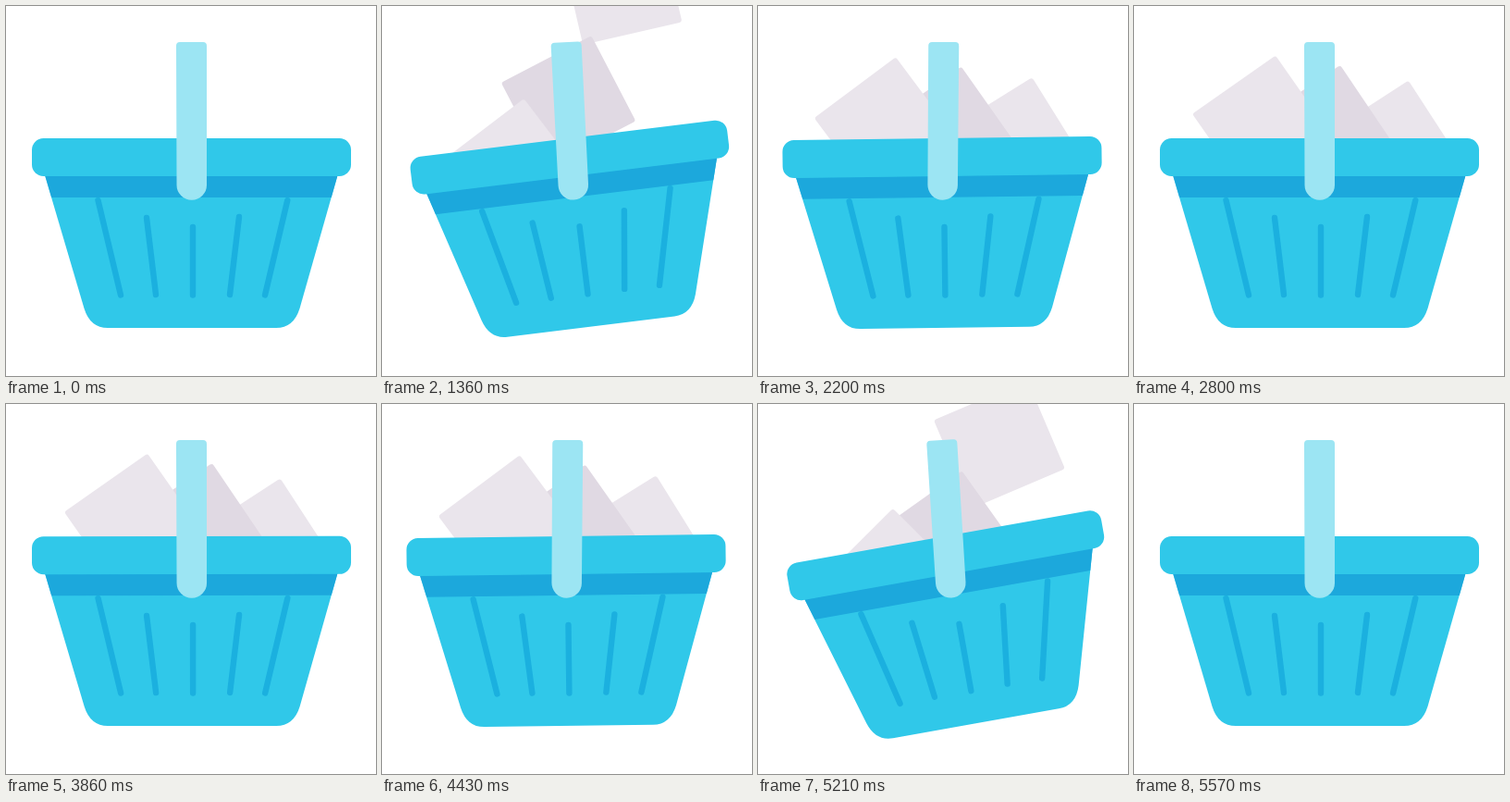
These frames come from a looping animation (400x400 px, 5.66 s). An HTML page:

```html
<!DOCTYPE html>
<html lang="en">
<head>
<meta charset="utf-8">
<title>Basket</title>
<style>
  html, body { margin: 0; width: 100%; height: 100%; overflow: hidden; background: #fff; }
  svg { display: block; width: 100%; height: 100%; }
</style>
</head>
<body>
<svg viewBox="0 0 400 400">
  <defs>
    <clipPath id="aboveRim"><rect x="-200" y="-400" width="800" height="580"/></clipPath>
  </defs>
  <g id="swing">
    <g id="basket">
      <g id="papers" clip-path="url(#aboveRim)"></g>
      <path fill="#30c8e9" d="M42 183H358.5L317.5 327Q311 348 292 348H110Q91 348 84.5 327Z"/>
      <path fill="#1ca8dc" d="M42.3 183.5H358.4L351.7 207H49.2Z"/>
      <path stroke="#1bb0df" stroke-width="6.4" stroke-linecap="round"
        d="M99.5 210L124 312.5M152 229L162 312M202 239V312.5M252 228L242 312M304.3 210L280 312.5"/>
      <rect x="28" y="143" width="345" height="41" rx="12.5" fill="#30c8e9"/>
    </g>
    <path fill="#9ce5f3" d="M184 43Q184 39 188 39H213Q217 39 217 43V193.5A16.25 16.25 0 0 1 184.5 193.5Z"/>
  </g>
</svg>
<script>
  const LOOP = 5660, STEP = 30;
  const FILL = 1090, FULL = 2800, EMPTY = 3860, DONE = 5570;
  const X = 200.5, TOP = 70, JOINT = 193.5;
  const W = 110, H = 104;

  // Tracks of [time, value]
  const handleTurn = [[1060, 0], [1360, -2.8], [1490, -4], [1750, -0.9], [2000, 1.8], [2420, -1], [2800, 0]];
  const basketTurn = [[1150, 0], [1360, -7], [1500, -13], [1750, 1.2], [1920, 8.4], [2340, -3.9], [2800, 0]];
  const drop = [[-120, -232], [0, -183], [30, -167], [150, -34], [270, 39.5], [345, 50], [420, 43.5],
    [540, 22], [660, -7], [710, -9], [1000, 2], [1300, 0]];
  const tilt = [[-120, 32], [0, 29.5], [30, 27], [150, 13.5], [270, 4.7], [420, -4], [540, -1.4],
    [660, 2.3], [760, 3], [1060, -1], [1400, 0]];

  // Resting places, back to front
  const sheets = [
    { x: 278.8, y: 154.1, turn: -33, start: 1330, fill: '#eae5ec' },
    { x: 206.5, y: 137.8, turn: -34, start: 1210, fill: '#e0d9e3' },
    { x: 137.8, y: 127.7, turn: -35, start: 1090, fill: '#eae5ec' }
  ];

  const $ = id => document.getElementById(id);
  for (const s of sheets) {
    s.node = document.createElementNS('http://www.w3.org/2000/svg', 'rect');
    const attrs = { x: -W / 2, y: -H / 2, width: W, height: H, rx: 3, fill: s.fill };
    for (const k in attrs) s.node.setAttribute(k, attrs[k]);
    $('papers').append(s.node);
  }

  // Smooth curve through the points, flat at peaks and ends
  function slope(p, i) {
    if (i === 0 || i === p.length - 1) return 0;
    const [a, b, c] = [p[i - 1], p[i], p[i + 1]];
    if ((b[1] - a[1]) * (c[1] - b[1]) <= 0) return 0;
    return (c[1] - a[1]) / (c[0] - a[0]);
  }

  function valueAt(p, t) {
    const last = p.length - 1;
    if (t <= p[0][0]) return p[0][1];
    if (t >= p[last][0]) return p[last][1];
    let i = 0;
    while (t >= p[i + 1][0]) i++;
    const [t0, v0] = p[i], [t1, v1] = p[i + 1];
    const d = t1 - t0, u = (t - t0) / d, w = 1 - u;
    return v0 * w * w * (1 + 2 * u) + v1 * u * u * (3 - 2 * u)
      + d * u * w * (slope(p, i) * w - slope(p, i + 1) * u);
  }

  // Filling plays forwards, emptying plays it backwards
  function phase(t) {
    const steps = from => Math.floor((t - from) / STEP) * STEP;
    if (t < FILL || t >= DONE) return 0;
    if (t < FULL) return FILL + steps(FILL);
    if (t < EMPTY) return FULL;
    return FULL - STEP - steps(EMPTY);
  }

  function draw(t) {
    const p = phase(t);
    const a = valueAt(handleTurn, p), b = valueAt(basketTurn, p);
    $('swing').setAttribute('transform', `rotate(${a} ${X} ${TOP})`);
    $('basket').setAttribute('transform', `rotate(${b - a} ${X} ${JOINT})`);
    for (const s of sheets) {
      const y = s.y + valueAt(drop, p - s.start);
      const turn = s.turn + valueAt(tilt, p - s.start);
      s.node.setAttribute('transform', `translate(${s.x} ${y}) rotate(${turn})`);
    }
  }

  const begin = performance.now();
  function tick() {
    draw((performance.now() - begin) % LOOP);
    requestAnimationFrame(tick);
  }
  tick();
</script>
</body>
</html>
```
